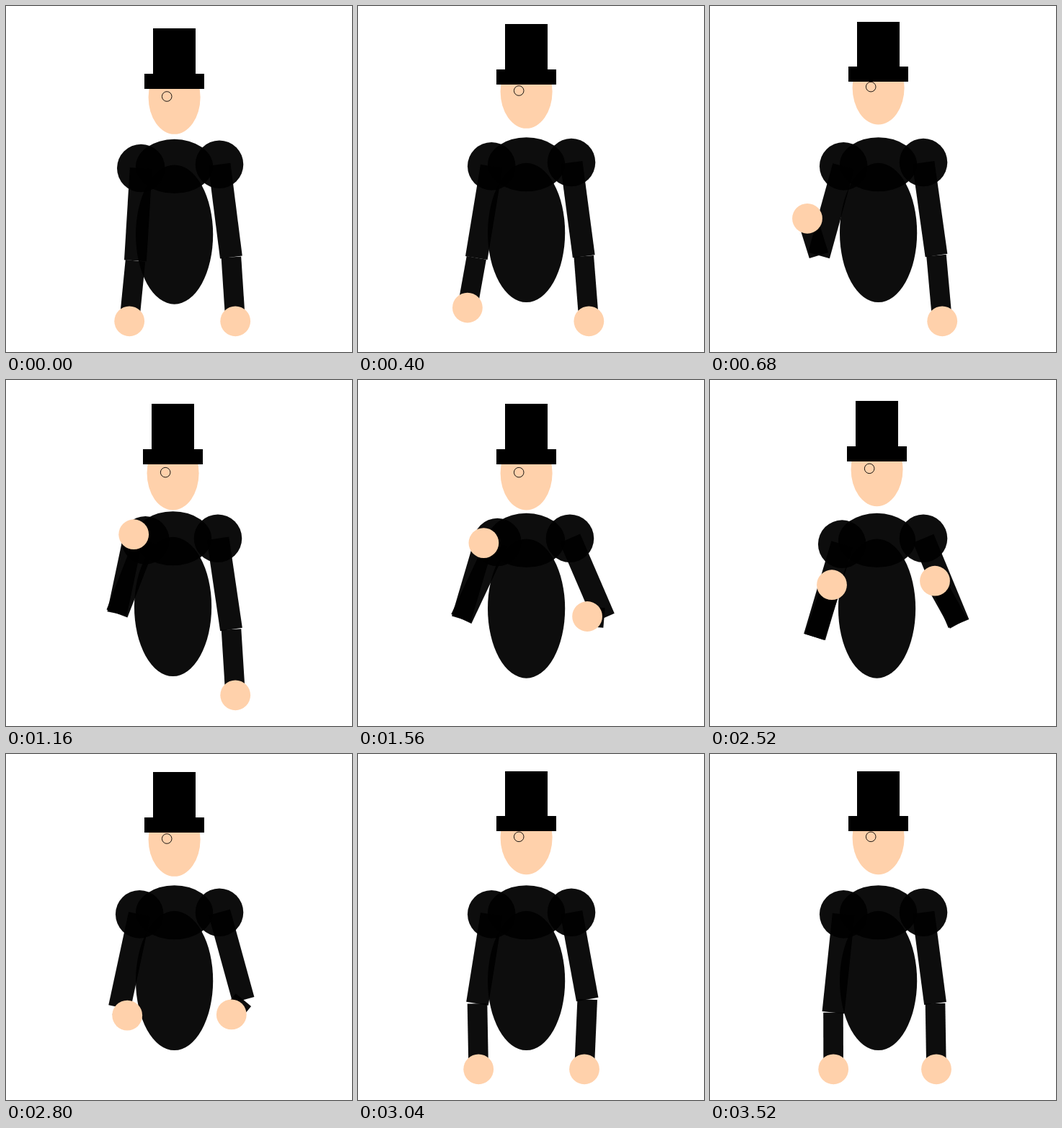
These frames come from a looping animation (480 by 480 pixels, 3600 ms). An HTML page with a canvas:

```html
<!DOCTYPE html>
<html lang="en">
<head>
<meta charset="utf-8">
<title>Top hat puppet</title>
<style>
  html, body { margin: 0; width: 100%; height: 100%; overflow: hidden; background: #fff; }
  canvas { display: block; width: 480px; height: 480px; }
</style>
</head>
<body>
<canvas id="stage" width="480" height="480"></canvas>
<script>
const ctx = document.getElementById('stage').getContext('2d');
const LOOP = 3600, TICK = 40;
const SUIT = 'rgba(0,0,0,0.95)', SKIN = '#ffd1ab';
const STEP_X = 2.04, STEP_Y = 2.667, FLOOR = 437.3;

// Torso moves in whole grid steps away from its rest position.
const torsoTimes = [80, 680, 1160, 1920, 2520, 2880];
const torso = {
  x:      [0, 0, -1, 0, -1, 0],
  y:      [0, -1, -1, 0, 0, -1],
  head:   [0, -5, 1, 1, -1, -4],
  leftX:  [0, -1, 3, 3, -2, -1],
  leftY:  [0, -1, -1, 1, 1, -1],
  rightX: [0, 0, -1, -1, 0, 0],
  rightY: [0, -1, 0, 0, 0, 0]
};

// Hands aimed below the floor line rest on it.
const armTimes = [80, 680, 1160, 1760, 1920, 2520, 2880, 3040, 3520];
const leftArm = {
  elbowX: [179.5, 151, 154, 138, 139.5, 145, 161, 165.5, 171],
  elbowY: [353.3, 346, 324, 335, 338, 356.5, 350, 346.3, 358.7],
  handX:  [171.2, 135, 177.2, 173, 171, 169, 168, 167.2, 171.2],
  handY:  [560, 294.8, 214.2, 232, 241, 284.2, 385, 560, 560]
};
const rightArm = {
  elbowX: [312.4, 314, 312.5, 356, 348.3, 345, 325, 318.2, 312.5],
  elbowY: [348.5, 346, 346, 322, 327.3, 338, 342, 340.5, 346],
  handX:  [318.2, 322.2, 318.2, 318, 312, 312, 313, 314, 314],
  handY:  [560, 540, 520, 232, 241, 278.7, 385, 560, 560]
};

function sample(times, values, t) {
  if (t <= times[0]) return values[0];
  const i = times.findIndex(k => k >= t);
  if (i < 0) return values[values.length - 1];
  const u = (t - times[i - 1]) / (times[i] - times[i - 1]);
  return values[i - 1] + (values[i] - values[i - 1]) * u;
}

function ellipse(x, y, rx, ry, color) {
  ctx.fillStyle = color;
  ctx.beginPath();
  ctx.ellipse(x, y, rx, ry, 0, 0, Math.PI * 2);
  ctx.fill();
}

function limb(x1, y1, x2, y2, width) {
  ctx.strokeStyle = SUIT;
  ctx.lineWidth = width;
  ctx.beginPath();
  ctx.moveTo(x1, y1);
  ctx.lineTo(x2, y2);
  ctx.stroke();
}

function drawArm(arm, shoulderX, shoulderY, t) {
  const at = key => sample(armTimes, arm[key], t);
  const ex = at('elbowX'), ey = at('elbowY');
  const hx = at('handX'), hy = Math.min(FLOOR, at('handY'));
  ellipse(shoulderX, shoulderY, 33.3, 33.3, SUIT);
  limb(shoulderX, shoulderY, ex, ey, 31);
  limb(ex, ey, hx, hy, 27.6);
  ellipse(hx, hy, 20.9, 20.9, SKIN);
}

function drawHead(x, dy) {
  const lift = dy * 0.72;
  const brim = Math.round(93.9 + lift), top = Math.round(31.2 + lift);
  const left = Math.round(x - 233.5);
  ellipse(x, 126.5 + dy, 36, 51.3, SKIN);
  ctx.fillStyle = '#000';
  ctx.fillRect(192 + left, brim, 83, 21);
  ctx.fillRect(204 + left, top, 59, brim - top);
  ctx.strokeStyle = '#000';
  ctx.lineWidth = 0.9;
  ctx.beginPath();
  ctx.arc(x - 10.4, 125.5 + dy, 6.8, 0, Math.PI * 2);
  ctx.stroke();
}

function draw(t) {
  const steps = key => Math.round(sample(torsoTimes, torso[key], t));
  const x = 233.6 + steps('x') * STEP_X;
  const y = 222.4 + steps('y') * STEP_Y;
  ctx.clearRect(0, 0, 480, 480);
  ellipse(x, y, 53.6, 37.6, SUIT);
  ellipse(x, y + 94.7, 53.6, 96.6, SUIT);
  drawHead(x, steps('head') * STEP_Y);
  drawArm(leftArm, 187.3 + steps('leftX') * STEP_X, 225 + steps('leftY') * STEP_Y, t);
  drawArm(rightArm, 296 + steps('rightX') * STEP_X, 219.7 + steps('rightY') * STEP_Y, t);
}

const start = performance.now();
function frame() {
  const t = (performance.now() - start) % LOOP;
  draw(Math.floor(t / TICK) * TICK);
  requestAnimationFrame(frame);
}
frame();
</script>
</body>
</html>
```
